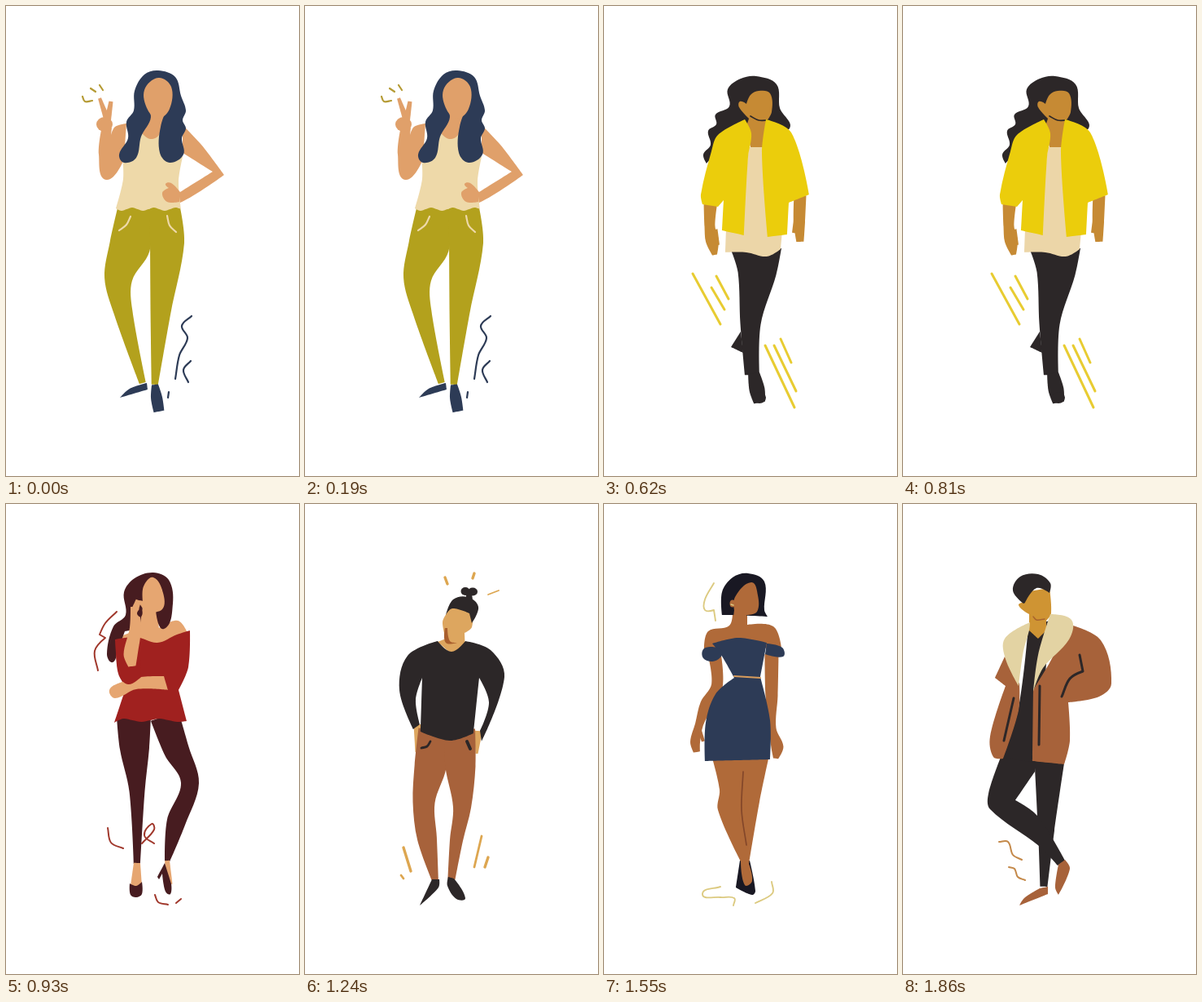
Animation, 360 px wide and 576 px high, one loop 2.17 s. Source, as an HTML page with a canvas:

```html
<!DOCTYPE html>
<html lang="en">
<head>
<meta charset="utf-8">
<title>People</title>
<style>
html, body { margin: 0; width: 100%; height: 100%; overflow: hidden; background: #fff; }
canvas { display: block; width: 360px; height: 576px; }
</style>
</head>
<body>
<canvas id="stage" width="360" height="576"></canvas>
<script>
const ctx = document.getElementById('stage').getContext('2d');
const STEP = 310;
const NAVY = '#2d3b56', BLACK = '#2c2728', WHITE = '#fff';

// Key points are written "x,y"; a trailing "!" makes a sharp corner.
const parse = text => text.trim().split(/\s+/).map(word => {
  const [x, y, w] = word.replace('!', '').split(',').map(Number);
  return { x, y, w, sharp: word.endsWith('!') };
});

// Smooth curve through the points, with handles a third of each span long.
function trace(pts, closed) {
  const n = pts.length;
  const at = i => pts[closed ? (i + n) % n : Math.max(0, Math.min(n - 1, i))];
  const handle = (i, len) => {
    const a = at(i - 1), b = at(i + 1), d = Math.hypot(b.x - a.x, b.y - a.y);
    return at(i).sharp || !d ? [0, 0] : [(b.x - a.x) / d * len, (b.y - a.y) / d * len];
  };
  ctx.beginPath();
  ctx.moveTo(pts[0].x, pts[0].y);
  for (let i = 0; i < (closed ? n : n - 1); i++) {
    const p = at(i), q = at(i + 1), len = Math.hypot(q.x - p.x, q.y - p.y) / 3;
    const [ax, ay] = handle(i, len), [bx, by] = handle(i + 1, len);
    ctx.bezierCurveTo(p.x + ax, p.y + ay, q.x - bx, q.y - by, q.x, q.y);
  }
}

function fillPoints(color, pts) {
  trace(pts, true);
  ctx.fillStyle = color;
  ctx.fill();
}

const blob = (color, ...shapes) => shapes.forEach(s => fillPoints(color, parse(s)));

// Tapered ribbon along joints "x,y,width" with flat ends.
function limb(color, ...limbs) {
  for (const text of limbs) {
    const joints = parse(text), last = joints.length - 1;
    const side = sign => joints.map((p, i) => {
      const a = joints[Math.max(0, i - 1)], b = joints[Math.min(last, i + 1)];
      const k = sign * p.w / 2 / Math.hypot(b.x - a.x, b.y - a.y);
      return { x: p.x - (b.y - a.y) * k, y: p.y + (b.x - a.x) * k, sharp: i === 0 || i === last };
    });
    fillPoints(color, [...side(1), ...side(-1).reverse()]);
  }
}

function oval(color, x, y, rx, ry) {
  ctx.beginPath();
  ctx.ellipse(x, y, rx, ry, 0, 0, Math.PI * 2);
  ctx.fillStyle = color;
  ctx.fill();
}

function line(color, width, ...strokes) {
  ctx.strokeStyle = color;
  ctx.lineWidth = width;
  for (const s of strokes) { trace(parse(s), false); ctx.stroke(); }
}

// Points of a wavy hem, running from right to left.
function hem(right, left, y, height, waves) {
  const n = waves * 4;
  return Array.from({ length: n - 1 }, (_, i) => {
    const k = (i + 1) / n;
    return `${right + (left - right) * k},${y - height * Math.sin(k * waves * 2 * Math.PI)}`;
  }).join(' ');
}

function peaceWoman() {
  const skin = '#e0a06a', cream = '#eed9a9';
  blob(skin, '148,144! 134,148 129,158! 130,149! 117,152! 114,182 123,213 145,188!',
    '217,146! 240,170 268,207! 214,241 196,239 192,229 214,228! 254,203! 217,180!');
  oval(skin, 121, 145, 10, 9);
  limb(skin, '115,113,4 124,138,8', '129,117,5 125,140,8');
  limb('#b3a11d', '159,246,42 152,295,50 138,335,34 144,375,23 168,462,8',
    '195,246,37 198,290,42 190,375,25 183,464,8');
  blob(cream, `158,150! 205,150! 217,185! 212,215 215,249! ${hem(215, 135, 249, 2, 3)} 135,248! 144,212 143,185!`);
  blob(skin, '179,130! 194,134! 188,158 177,163 166,155!',
    '192,229 200,223! 196,218 203,217 214,228! 213,240! 198,240');
  blob(NAVY, '187,79 208,87 215,110 221,128 217,140 221,150 216,162 218,182 201,192 189,180 190,148 204,110! 187,90! 170,108 178,136 166,160 160,186 145,192 139,182 150,162 148,142 157,128 158,104 170,84');
  blob(skin, '187,88 203,99 201,126 187,138 174,127 170,103');
  blob(NAVY, '173,462! 174,470! 140,480! 152,469');
  limb(NAVY, '183,464,8 185,480,14 188,497,13');
  line(cream, 2.2, '153,258 148,268 139,275', '198,257 201,269 209,277');
  line(NAVY, 2.2, '228,380 216,392 223,407 213,428 208,457', '227,435 218,446 224,461', '200,473 199,480');
  line('#b59b35', 2.2, '94,111 97,117 106,116', '104,101 110,105', '115,97 119,103');
}

function redShirtMan() {
  const skin = '#cf9033', red = '#9c2320', hair = '#74412a';
  blob(skin, '172,100! 212,100! 213,116 205,128 203,138! 207,147! 191,160! 177,147! 181,137! 175,125 170,114');
  blob(hair, '171,92! 213,92! 212,110! 206,102 186,103 180,110! 171,108!');
  for (let i = 0; i <= 8; i++) {
    const a = Math.PI * (0.92 + i * 0.145);
    oval(hair, 192 + 19 * Math.cos(a), 99 + 11.5 * Math.sin(a), 4.5, 4.5);
  }
  line('#925329', 1.2, '181,136 190,138 200,137');
  blob(NAVY, '152,251! 198,254! 216,274! 210,370 199,432! 207,451! 197,457! 193,477! 180,477! 180,433! 138,384 134,350 139,275!');
  blob(WHITE, '173,338! 181,362 179,393! 169,372!');
  blob(red, '176,143! 146,152 122,192 109,224 139,274! 152,254! 197,255! 206,272 249,246 249,212 240,166 206,144! 191,160!');
  blob(WHITE, '145,202! 133,218! 144,241!', '226,200! 229,235! 214,248! 223,228');
  line(NAVY, 1.8, '145,203! 133,218! 144,241!', '176,146! 167,160! 178,165! 184,158!',
    '207,147! 214,153! 212,162! 203,161! 199,166!', '193,183 191,193', '196,259 200,271 209,273');
  line(NAVY, 2.3, '192,160 180,237', '225,187 229,235');
  blob(hair, '180,478! 193,476! 192,489! 147,492! 161,484',
    '202,455! 212,452! 224,491! 217,487');
  line(NAVY, 1.8, '114,374 125,400 147,427', '151,429 156,432', '121,432 128,439');
}

function yellowJacketWoman() {
  const skin = '#c68a34', yellow = '#ebcd0c';
  blob(BLACK, '187,86 212,96 216,125 228,150 204,143! 150,165! 126,193! 122,182 131,170 128,153 138,145 137,133 154,123 152,102 168,89');
  blob(skin, '190,104 204,107 206,130 199,142! 197,176! 181,176! 174,150! 178,138! 166,124 167,117 175,120! 180,109');
  line(BLACK, 1.7, '180,135 190,140 202,140');
  limb(BLACK, '187,298,62 188,328,47 180,390,25 182,452,18', '184,450,14 188,470,19 191,486,14');
  blob(BLACK, '168,399! 156,418! 171,425!');
  oval(BLACK, 191, 480, 8, 7);
  blob('#ecd6a8', '178,173! 198,173! 205,276! 219,276! 217,298! 200,307 175,302 149,302! 150,274! 168,270!');
  limb(skin, '131,240,17 130,270,13 133,288,16 136,305,6', '136,274,7 140,293,4',
    '241,232,15 240,265,14 241,289,9', '236,258,5 233,278,4');
  blob(yellow, '173,139! 181,156 177,185 172,281! 145,275! 147,238! 140,246! 121,243! 119,231 132,178 140,158',
    '199,139! 230,155 252,231! 227,241! 225,280! 201,283! 194,180');
  line('#e8cc32', 3, '109,328 143,390', '138,331 153,359', '132,345 148,372',
    '198,416 234,492', '209,416 236,472', '217,408 230,437');
}

function redTopWoman() {
  const skin = '#e6a671', red = '#a0211f', wine = '#471c20', swirl = '#a0372b';
  blob(skin, '165,128! 186,130! 188,152! 211,143 223,158! 200,176! 140,176! 134,165! 164,153!');
  blob(wine, '181,84 200,93 205,122 194,153 184,130! 192,105! 172,100! 164,153! 146,156! 137,180 131,194 124,184 132,150 147,136 145,108 158,91');
  blob(skin, '181,90 193,109 192,129 172,133! 163,119 168,119! 169,101');
  limb(wine, '157,260,42 158,300,36 161,352,19 161,441,8', '195,260,36 210,303,31 226,342,22 209,390,23 198,438,6');
  blob(red, `134,166! 160,163 186,170 210,160 226,155! 224,200 212,228! 222,266! ${hem(222, 133, 265, -2, 2)} 133,268! 147,226! 138,205`);
  blob(skin, '194,211! 199,228! 160,227 134,238 127,228 140,219 166,212');
  blob(red, '135,167! 165,190! 166,212! 150,221 138,208');
  limb(skin, '158,126,10 159,152,14 153,185,17 155,199,9');
  limb(skin, '163,118,7 157,133,9');
  blob(wine, '161,134 166,129 166,138');
  limb(skin, '161,440,8 160,468,14', '198,437,6 201,466,7');
  blob(wine, '152,465! 160,468 167,463! 167,478 160,482 153,479',
    '195,440! 203,465! 202,478 196,475 192,453! 188,460! 186,457!');
  line(swirl, 2, '136,132 122,146 115,160! 122,164! 109,180 113,204',
    '125,397 129,415 144,422', '167,416 182,399 179,392 170,406 182,416',
    '183,479 187,488 199,491', '209,489 215,484');
}

function bunMan() {
  const skin = '#dda65f', gold = '#dda650';
  limb(skin, '138,270,9 138,304,5', '213,278,10 211,306,3');
  limb('#a7623b', '158,276,37 154,322,39 146,366,27 150,410,24 160,461,8',
    '190,276,38 191,322,37 193,372,22 186,412,16 180,460,9');
  blob(skin, '177,125! 206,130! 205,151 196,158! 197,182! 178,182! 163,169! 173,165! 169,145 174,134!');
  blob('#a95f2e', '172,152! 175,152! 178,168 187,170! 173,170');
  blob(BLACK, '173,136! 182,117 200,114 213,126 205,146! 202,134! 181,128');
  oval(BLACK, 197, 107, 5.5, 5);
  oval(BLACK, 206, 107.5, 6, 5);
  limb(BLACK, '201,106,6 202,117,8');
  blob(BLACK, '163,168! 180,181 197,168! 228,179 245,212 217,291! 215,278! 226,243 214,213! 207,281! 178,290 142,279! 144,213! 136,240 141,270! 133,276! 116,228 126,186');
  line(BLACK, 2.8, '154,291 150,297 143,299');
  line(BLACK, 4, '199,291 203,300');
  blob(BLACK, '156,460! 165,460! 164,470 141,492!', '176,457! 183,459! 197,483 186,484 175,468');
  line(gold, 3.4, '172,90 175,98', '208,85 206,91', '121,421 130,450', '225,433 221,445');
  line(gold, 2.8, '217,407 208,445', '118,455 121,459');
  line(gold, 1.8, '225,111 238,106');
}

function dressWoman() {
  const skin = '#b06a39', ink = '#191823', gold = '#dcca80';
  blob(ink, '167,437! 162,470! 182,479 186,474 179,437!');
  blob(skin, '132,308! 203,308! 191,365 178,441! 182,462 173,467 168,438! 140,375 142,350',
    '158,130! 176,134! 176,148! 208,150 218,176! 123,178! 128,156 154,149');
  limb(skin, '136,186,16 139,222,14 126,246,16 117,270,10 112,292,12 114,304,8', '117,276,5 122,291,4',
    '206,184,17 206,235,15 207,275,9 213,298,15 211,312,6');
  blob(ink, '177,85 197,95 197,130 201,138! 160,136! 145,136! 145,108 158,90');
  blob(skin, '181,96 189,112 188,132 175,136! 174,147! 158,148! 160,130! 161,114');
  oval(skin, 158, 122, 3.5, 4.5);
  line(gold, 1.4, '156,123 159,124');
  blob(NAVY, '133,171! 165,164 200,170! 192,212! 204,265 204,313! 124,315! 125,268 137,233 160,213! 144,185');
  blob(NAVY, '122,178 133,175 145,180 143,188 133,193 122,189', '200,171! 219,176 220,187 198,184!');
  line('#d89c5c', 2, '160,211 192,213');
  line('#83472a', 1.7, '171,328 169,375 175,418');
  line(gold, 1.9, '135,97 124,117 124,130 135,130! 137,143',
    '143,469 121,478 143,482 160,483 159,492', '206,463 207,477 186,489');
}

function coatMan() {
  const skin = '#cf9433', rust = '#a7623a', cream = '#e3d3a3';
  limb(BLACK, '180,314,37 176,400,20 173,469,9');
  blob(BLACK, '121,308! 162,310! 162,328! 138,363! 165,382 199,437! 190,443! 167,419 107,374 105,355',
    '154,150! 180,143! 174,225! 163,317! 122,311! 142,250');
  blob(skin, '149,108! 180,103! 182,134 176,143! 176,155! 166,165! 155,155! 155,135! 142,124 150,120!');
  line('#a8642d', 1.5, '160,138 164,142 174,141');
  blob(BLACK, '148,122! 135,106 144,89 166,86 181,97 180,109! 164,103 150,121!');
  blob(rust, '125,187! 113,213! 126,223! 107,285 111,310 123,312! 142,253 143,220!',
    '205,148! 243,167 256,220 241,236 203,243! 205,290 198,319! 159,315! 160,228! 180,195!');
  blob(cream, '156,145! 125,165 126,190 142,223! 148,180 155,155',
    '181,135! 207,142 204,166 172,201 160,230! 166,185');
  line(BLACK, 3, '136,238 124,290', '168,223 167,295', '217,185! 221,205! 205,214 195,236');
  blob(rust, '168,471! 178,469! 178,478! 143,492! 149,483', '191,442! 199,436! 205,447 191,479! 187,470');
  line('#c4894a', 2, '118,414 129,414 135,430 146,436', '130,445 137,447 141,457 150,461');
}

const people = [peaceWoman, redShirtMan, yellowJacketWoman, redTopWoman, bunMan, dressWoman, coatMan];
const start = performance.now();
let shown = -1;

function tick(now) {
  const index = Math.floor(Math.max(0, now - start) / STEP) % people.length;
  if (index !== shown) {
    shown = index;
    ctx.fillStyle = WHITE;
    ctx.fillRect(0, 0, 360, 576);
    people[index]();
  }
  requestAnimationFrame(tick);
}

ctx.lineCap = ctx.lineJoin = 'round';
tick(start);
</script>
</body>
</html>
```
